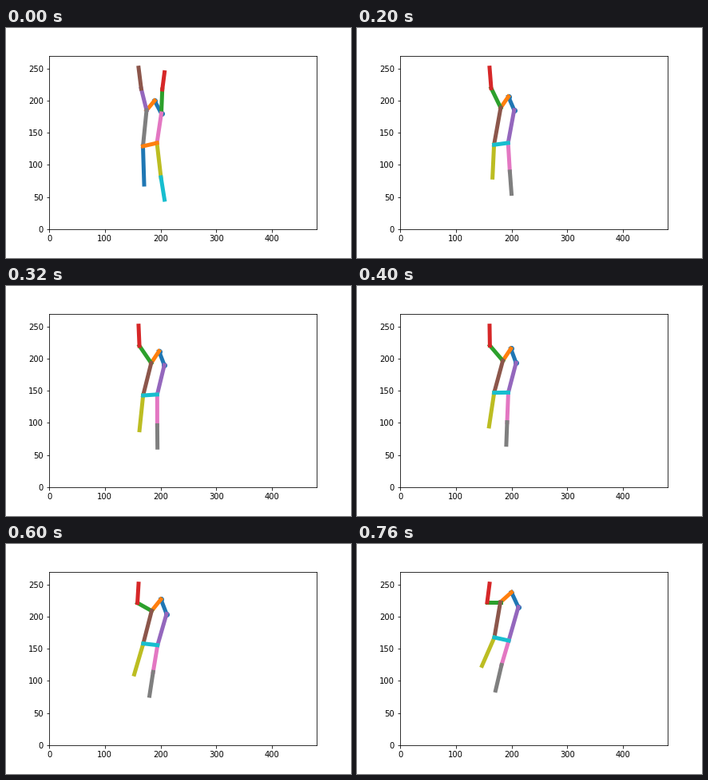
Animation, 432 px wide and 288 px high, one loop 0.8 s. Source, as a matplotlib script:

```python
import math

import matplotlib.pyplot as plt
from matplotlib.animation import FuncAnimation

FRAMES = 20
ARM_GONE = 5  # the raised right arm is no longer tracked from here on

# Each joint travels from start to end, bowed sideways; stage pixels.
STILL = (0, 0)
JOINTS = {
    "neck": ((186, 91), (193.4, 60.5), (3.2, 1.6)),
    "r_shoulder": ((194.5, 107), (202, 79), (1.2, 2.2)),
    "l_shoulder": ((176, 103), (179.5, 73), (5, 4.5)),
    "r_elbow": ((195.7, 77), (195.7, 77), STILL),
    "r_wrist": ((198.5, 55.5), (198.5, 55.5), STILL),
    "l_elbow": ((169.3, 76), (163, 73), STILL),
    "l_wrist": ((166, 49.7), (166, 49.7), STILL),
    "r_hip": ((189, 144), (190, 121), STILL),
    "l_hip": ((171.5, 148), (172, 117), STILL),
    "r_knee": ((194, 187), (181, 151.5), STILL),
    "r_ankle": ((198.5, 215), (173.5, 183.5), (0, -1.7)),
    "l_ankle": ((173, 196), (156.5, 152.5), STILL),
}

RIGHT_ARM = [("r_shoulder", "r_elbow"), ("r_elbow", "r_wrist")]
LIMBS = [
    ("neck", "r_shoulder"), ("neck", "l_shoulder"),
    *RIGHT_ARM,
    ("l_shoulder", "l_elbow"), ("l_elbow", "l_wrist"),
    ("r_shoulder", "r_hip"), ("l_shoulder", "l_hip"),
    ("r_hip", "r_knee"), ("r_knee", "r_ankle"),
    ("l_hip", "l_ankle"), ("l_hip", "r_hip"),
]

fig, ax = plt.subplots(figsize=(6, 4), dpi=72)
fig.subplots_adjust(left=0.125, right=0.9, bottom=0.125, top=0.88)
ax.set_xlim(0, 480)
ax.set_ylim(0, 270)
lines = [ax.plot([], [], lw=5)[0] for _ in LIMBS]
lines[0].set_marker("o")


def joint_at(name, frame):
    start, end, bow = JOINTS[name]
    ease = (frame / (FRAMES - 1)) ** 1.2
    arc = 4 * ease * (1 - ease)
    x, y = (a + (b - a) * ease + c * arc for a, b, c in zip(start, end, bow))
    if name.endswith("hip"):
        # the hips sink briefly early in the rise
        y += 4.5 * math.exp(-((frame - 5) / 1.2) ** 2)
    # stage pixels to axis units
    return (x - 54) * 480 / 334.8, (252 - y) * 270 / 217.44


def draw(frame):
    count = 0
    for limb, line in zip(LIMBS, lines):
        if limb in RIGHT_ARM and frame >= ARM_GONE:
            line.set_data([], [])
            continue
        line.set_data(*zip(*(joint_at(name, frame) for name in limb)))
        line.set_color(f"C{count % 10}")
        count += 1
    return lines


anim = FuncAnimation(fig, draw, frames=FRAMES, interval=40, repeat=True,
                     repeat_delay=0)
plt.show()
```
